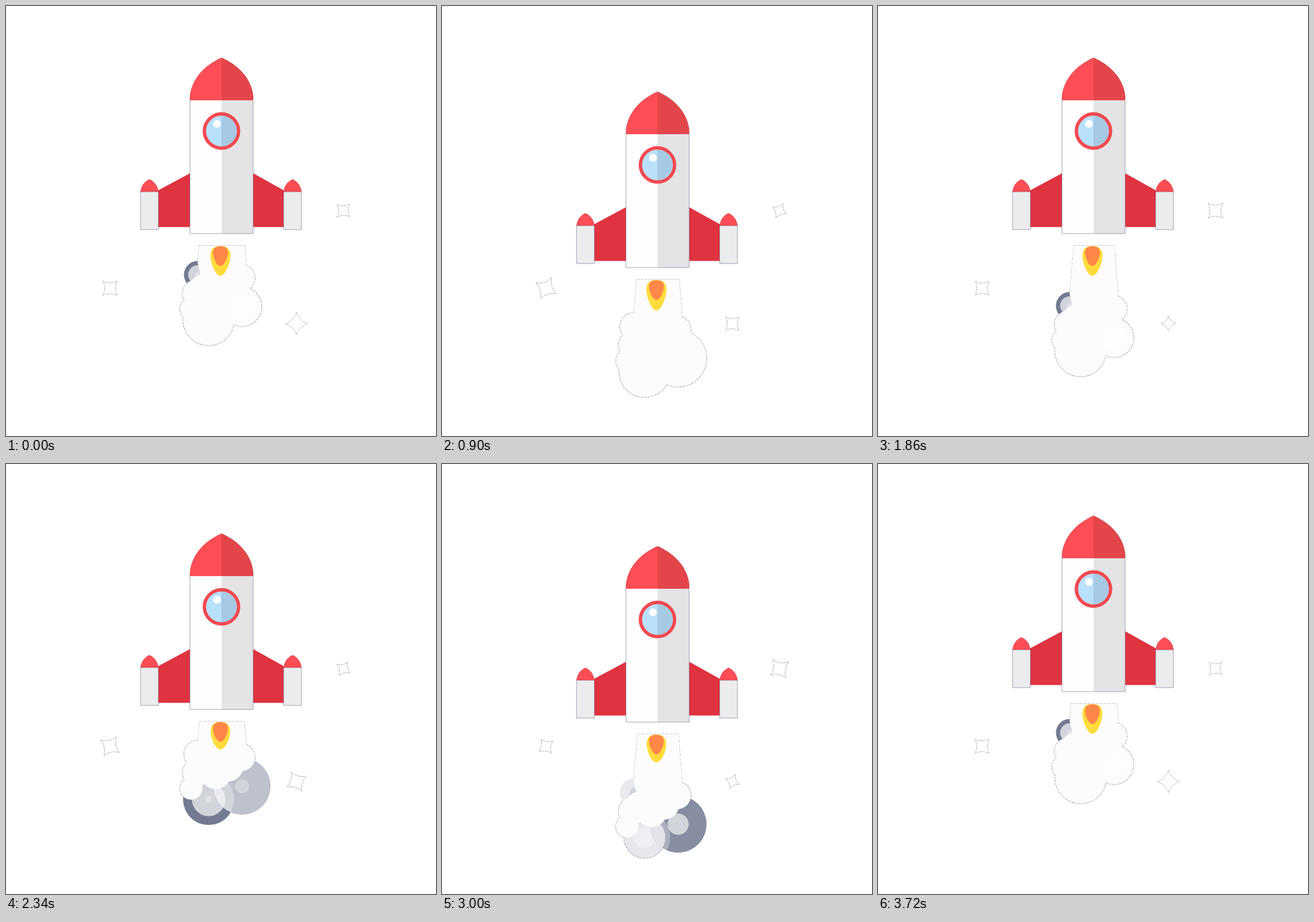
Animation, 748 px wide and 748 px high, one loop 3.78 s. Source, as an HTML page with a canvas:

```html
<!DOCTYPE html>
<html lang="en">
<head>
<meta charset="utf-8">
<title>Rocket</title>
<style>
html, body { margin: 0; width: 100%; height: 100%; overflow: hidden; background: #fff; }
canvas { display: block; width: 100vmin; height: 100vmin; }
</style>
</head>
<body>
<canvas id="stage" width="748" height="748"></canvas>
<script>
const ctx = document.getElementById('stage').getContext('2d');
const LOOP = 3780, STEP = 60, PUFF = 620, TAU = Math.PI * 2;
const WHITE = [252, 252, 254], SLATE = [115, 122, 145], MIST = [210, 212, 219];
const CLOUD = `rgb(${WHITE})`, LINE = 'rgba(105,110,142,.8)';
const RED = '#ff4d55', RED_SHADE = '#e3464a';

const clamp = v => Math.max(0, Math.min(1, v));
const mix = (a, b, k) => `rgb(${a.map((v, i) => Math.round(v + (b[i] - v) * k))})`;
const swing = (t, period) => (1 - Math.cos(TAU * t / period)) / 2;

function disc(x, y, r, fill) {
  ctx.beginPath();
  ctx.arc(x, y, Math.max(0, r), 0, TAU);
  if (fill) { ctx.fillStyle = fill; ctx.fill(); }
}

function shape(d, fill, stroke, dash = []) {
  const p = new Path2D(d);
  if (fill) { ctx.fillStyle = fill; ctx.fill(p); }
  if (stroke) {
    ctx.strokeStyle = stroke;
    ctx.lineWidth = 0.8;
    ctx.setLineDash(dash);
    ctx.stroke(p);
    ctx.setLineDash([]);
  }
}

// x, y, tip radius, pulse, pulse peak, base angle, swing angle
const stars = [
  [587, 356, 17, 3.6, 380, 45, 18],
  [181, 491, 17.3, 3.2, 950, 45, 17],
  [505.3, 552.5, 16.3, 3.4, -60, 0, 45]
];

function drawStar(t, [x, y, size, pulse, peak, base, tilt]) {
  const r = size + pulse * Math.cos(TAU * (t - peak) / 1240);
  const c = r * 0.25;
  ctx.save();
  ctx.translate(x, y);
  ctx.rotate((base + tilt * Math.sin(TAU * t / 1240)) * Math.PI / 180);
  shape(`M0 ${-r}Q${c} ${-c} ${r} 0Q${c} ${c} 0 ${r}Q${-c} ${c} ${-r} 0Q${-c} ${-c} 0 ${-r}Z`,
    '#fff', LINE, [3, 1.5]);
  ctx.restore();
}

// times are counted from start: ring fades in, core turns pale, core fills the ring
const puffs = [
  { x: 333.5, y: 467.5, r: 24, start: 440, fade: 65, pale: 230, span: 260 },
  { x: 352.5, y: 546, r: 44.5, start: 310, fade: 30, pale: 230, span: 260 },
  { x: 410.7, y: 523, r: 49.5, start: 405, fade: 30, pale: 212, span: 312 }
];
const lumps = [
  [331, 500, 24], [322, 527, 19.6], [409, 473, 24],
  [386, 488, 27], [365, 502, 26], [345, 492, 26]
];
const PLUME = 'M341.8 350L333.3 446L345 500H400L417.6 446L410 350Z';
const CUT = 190;

function puffState(t, p) {
  const q = (t - p.start + PUFF * 2) % PUFF;
  const settled = q < p.fade || q >= p.span;
  const hole = settled ? p.r : p.r * q / p.span;
  const ring = !settled && q < CUT;
  return {
    ...p, q, settled, hole, ring,
    body: mix(WHITE, SLATE, clamp((q - p.fade) / 100)),
    core: mix(MIST, WHITE, settled ? 1 : clamp((q - CUT) / (p.pale - CUT)))
  };
}

function drawPuff(s) {
  if (s.ring) disc(s.x, s.y, s.r, s.body);
  disc(s.x, s.y, s.hole, s.core);
  if (!s.settled && s.q > 150) {
    disc(s.x, s.y, (s.q - 150) * 0.3 * s.r / 44, 'rgba(255,255,255,.3)');
  }
}

function drawSmoke(t, rise, drift) {
  const states = puffs.map(p => puffState(t % PUFF, p));
  const [, left, right] = states;
  ctx.save();
  ctx.beginPath();
  ctx.rect(0, 416 + rise, 748, 332);
  ctx.clip();
  ctx.translate(0, rise + drift);

  // outlines first, so the fills leave only the silhouette
  ctx.strokeStyle = LINE;
  ctx.lineWidth = 1.4;
  ctx.setLineDash([4, 1.5]);
  const rims = lumps.concat(states.filter(s => !s.ring).map(s => [s.x, s.y, s.hole]));
  for (const c of rims) { disc(...c); ctx.stroke(); }
  shape(PLUME, null, LINE, [6, 2]);

  states.forEach(drawPuff);
  if (right.ring) {
    ctx.save();
    disc(right.x, right.y, right.r);
    ctx.clip();
    disc(left.x, left.y, left.r, 'rgba(255,255,255,.3)');
    disc(left.x, left.y, left.hole, 'rgba(245,245,247,.75)');
    ctx.restore();
    disc(right.x, right.y, right.hole, right.core);
  }
  for (const c of lumps) disc(...c, CLOUD);
  shape(PLUME, CLOUD);
  ctx.restore();

  const inset = drift * 0.088;
  shape(`M${336 + inset} ${416.5 + rise}H${415 - inset}`, null, 'rgba(105,110,142,.5)', [5, 2]);
}

function drawFlame(t) {
  const k = Math.sin(TAU * t / PUFF);
  const w = 17.5 + k * 0.5, end = 469.3 + k * 4;
  shape(`M373 417.5C${373 + w * 0.75} 417.5 ${373 + w} 425 ${373 + w} 434` +
    `C${373 + w} 446 ${373 + 9} ${end} 373 ${end}` +
    `C${373 - 9} ${end} ${373 - w} 446 ${373 - w} 434` +
    `C${373 - w} 425 ${373 - w * 0.75} 417.5 373 417.5Z`, '#ffdc3c');
  shape('M373 418C382 418 386 422 386 429C386 438 379 452.5 373 452.5' +
    'C367 452.5 360 438 360 429C360 422 364 418 373 418Z', '#ff8748');
}

function drawBooster(x) {
  shape(`M${x} 323H${x + 31}V389H${x}Z`, '#ececee', LINE);
  shape(`M${x} 323C${x + 1} 313 ${x + 7} 305 ${x + 15.5} 301.5` +
    `C${x + 24} 305 ${x + 30} 313 ${x + 31} 323Z`, RED, 'rgba(90,35,50,.65)', [2, 2]);
}

function drawRocket() {
  shape('M320 291L265 320.5V384.5H320ZM430 291L483 320.5V384.5H430Z', '#df3340');
  drawBooster(234);
  drawBooster(483);

  shape('M320 164H375V396H320Z', '#fdfdfe');
  shape('M375 164H430V396H375Z', '#e4e3e6');
  shape('M320 164V396H430V164', null, LINE);

  const tip = 'M320 164V157C323 127 345 103 375 90';
  shape(tip + 'V164Z', RED);
  shape('M375 90C405 103 427 127 430 157V164H375Z', RED_SHADE);
  shape(tip + 'C405 103 427 127 430 157V164', null, 'rgba(80,30,45,.65)', [2, 2]);

  disc(374.8, 217.5, 32.7, '#f4494f');
  disc(374.8, 217.5, 26.8, '#b9e1fc');
  ctx.beginPath();
  ctx.arc(374.8, 217.5, 26.8, -Math.PI / 2, Math.PI / 2);
  ctx.fillStyle = '#a7cae4';
  ctx.fill();
  disc(367, 205, 6.8, '#fff');
}

function render(t) {
  const rise = Math.round(59.5 * swing(t + 20, 1880));
  const drift = 54 * swing(t, 1240);
  ctx.fillStyle = '#fff';
  ctx.fillRect(0, 0, 748, 748);
  for (const s of stars) drawStar(t, s);
  drawSmoke(t, rise, drift);
  ctx.save();
  ctx.translate(0, rise);
  drawFlame(t);
  drawRocket();
  ctx.restore();
}

const begin = performance.now();
function tick() {
  const t = (performance.now() - begin) % LOOP;
  render(Math.floor(t / STEP) * STEP);
  requestAnimationFrame(tick);
}
tick();
</script>
</body>
</html>
```
